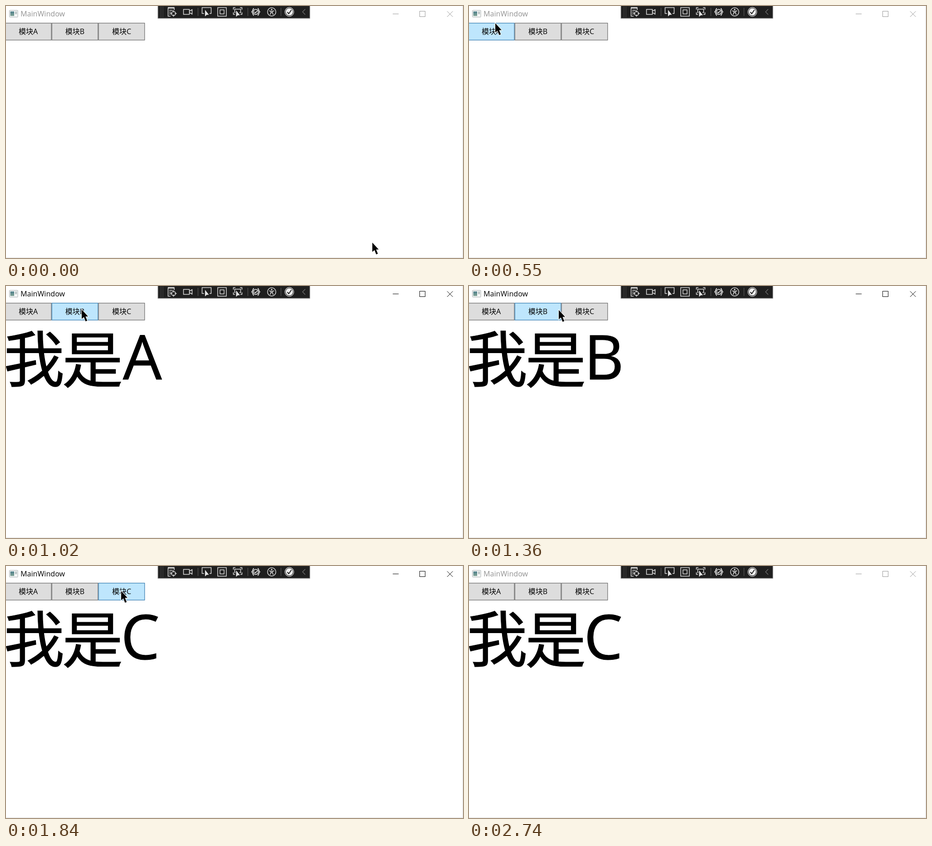
An HTML page for the animation above (2810 ms loop, 1008 by 556 pixels).

```html
<!DOCTYPE html>
<html lang="zh">
<head>
<meta charset="utf-8">
<title>MainWindow</title>
<style>
  html, body { margin: 0; width: 100%; height: 100%; overflow: hidden; background: #fff; }
  svg { display: block; width: 1008px; height: 556px; }
  text { font-family: "Open Sans", "Noto Sans CJK SC", "Noto Sans CJK", sans-serif; }
  .han { font: 134px "Noto Sans CJK SC", "Noto Sans CJK", sans-serif; }
  .label { font-size: 16px; text-anchor: middle; }
</style>
</head>
<body>
<svg viewBox="0 0 1008 556">
  <defs>
    <path id="pick" d="M0 0V14.5L3.6 11L8.5 10.8Z"/>
    <linearGradient id="pane" x2="0" y2="1">
      <stop offset="0" stop-color="#4f7f8c"/><stop offset="1" stop-color="#7fa395"/>
    </linearGradient>
  </defs>
  <rect width="1008" height="556" fill="#fff"/>
  <path d="M1007.5 0V555.5H0" fill="none" stroke="#dedede"/>

  <!-- title bar -->
  <g>
    <rect x="7.5" y="9.5" width="18.5" height="15" rx="1" fill="#f4f6f6" stroke="#a9afb0"/>
    <rect x="9.5" y="12" width="8.5" height="10" fill="url(#pane)"/>
    <rect x="20" y="12" width="4" height="6" fill="#bcc5c6"/>
  </g>
  <text id="title" x="32" y="23" font-size="16.1">MainWindow</text>
  <g id="controls" fill="none">
    <path d="M853 17.5H866"/>
    <rect x="912.5" y="11.5" width="12" height="12"/>
    <path d="M973 11.5L985.5 24M985.5 11.5L973 24"/>
  </g>

  <!-- debug toolbar -->
  <rect x="335.3" y="-2" width="334.7" height="29" fill="#1f1f1f" stroke="#666" stroke-width="1.28"/>
  <g id="grip" fill="#606060"></g>
  <path d="M423.5 4V22M533.5 4V22M606.5 4V22" stroke="#5e5e5e"/>
  <g fill="none" stroke="#dcdcdc" stroke-width="1.5">
    <path d="M357.5 4V22.5H363M371 4V9"/>
    <path d="M357 4H371.5" stroke-width="3"/>
    <path d="M360 9.5H368M360 13.5H363.5M360 17.5H363"/>
    <circle cx="369.5" cy="16.5" r="4.6"/>
    <path d="M369.5 9.5V14M369.5 19V23.5M362.5 16.5H367M372 16.5H376.5"/>
    <path d="M391.5 7.5H404.5V18.5H391.5ZM404.5 11.5L410.5 8V18L404.5 14.5"/>
    <path d="M437 16.5H432.5V3.5H452.5V16.5H449"/>
    <rect x="467" y="3.5" width="19" height="19"/>
    <rect x="472" y="8.5" width="9" height="9"/>
    <path d="M501.5 8V3.5H506M516 3.5H520.5V8M501.5 14V18.5H505M520.5 14V18.5H517"/>
    <path d="M506 14.5H504.5V7H517.5V14.5H515"/>
    <g stroke-width="1.8">
      <path d="M547 5.5C543.5 5.5 545.5 12 541.5 13C545.5 14 543.5 20.5 547 20.5M555 5.5C558.5 5.5 556.5 12 560.5 13C556.5 14 558.5 20.5 555 20.5"/>
      <circle cx="551" cy="13" r="5.6"/>
      <path d="M548 13L550.3 15.3L554.3 10.7"/>
    </g>
    <circle cx="586" cy="13" r="9.2"/>
    <path d="M580.5 10.5L584 11.7H588L591.5 10.5M584.3 11.7V14.5L582.5 19.2M587.7 11.7V14.5L589.5 19.2M584.3 14.7H587.7"/>
  </g>
  <circle cx="586" cy="8" r="1.7" fill="#dcdcdc"/>
  <g fill="#e4e4e4" stroke="#1f1f1f" stroke-width="1.2" paint-order="stroke">
    <use href="#pick" x="439" y="8.5"/>
    <use href="#pick" x="507.5" y="9.5"/>
  </g>
  <circle cx="625" cy="13" r="9.8" fill="#1f1f1f" stroke="#e6e6e6" stroke-width="1.2"/>
  <circle cx="625" cy="13" r="8" fill="#f0f0f0"/>
  <path d="M620.5 13.5L623.7 17L629.5 8.7" fill="none" stroke="#1f1f1f" stroke-width="2"/>
  <path d="M660 7L654 13L660 19" fill="none" stroke="#777" stroke-width="1.1"/>

  <g id="tabs" stroke-width="1.28"></g>

  <g id="view" stroke="#000" stroke-width="1.2">
    <text class="han" x="-5" y="211">我</text>
    <text class="han" x="124" y="213">是</text>
    <text id="letter" y="205.5" font-size="135"></text>
  </g>

  <path id="cursor" d="M0 0V20.5L4.8 16.5L8.5 26L12.2 24.5L8.4 15.2H14Z"
        stroke="#fff" stroke-width="2" paint-order="stroke"/>
</svg>
<script>
const LOOP = 2810;
const $ = id => document.getElementById(id);

function add(parent, tag, attrs, text = "") {
  const el = document.createElementNS("http://www.w3.org/2000/svg", tag);
  for (const key in attrs) el.setAttribute(key, attrs[key]);
  el.textContent = text;
  return parent.appendChild(el);
}

for (let row = 0; row < 8; row++)
  for (let col = 0; col < 3; col++)
    add($("grip"), "rect", { x: 340 + col * 3, y: 2 + row * 3, width: 1.2, height: 1.2 });

const TAB = 102.9;
const tabs = ["A", "B", "C"].map((name, i) => {
  const left = -2.3 + i * TAB;
  const box = add($("tabs"), "rect", {
    x: left + 0.64, y: 37.7, width: TAB - 1.28, height: 37.5
  });
  add($("tabs"), "text", { class: "label", x: left + TAB / 2, y: 62 }, "模块" + name);
  return { left, box };
});

// Pointer strokes: sampled in discrete steps along a quadratic curve.
const strokes = [
  { start: 70, end: 550, steps: 8, from: [808, 522], via: [130, 250], to: [58, 38], power: 1 },
  { start: 620, end: 1020, steps: 7, from: [58, 38], via: [112, 50], to: [167, 52], power: 1.6 },
  { start: 1290, end: 1570, steps: 5, from: [167, 52], via: [212, 53], to: [254, 55], power: 1 },
  { start: 1910, end: 2190, steps: 5, from: [255, 55], via: [290, 200], to: [840, 486], power: 1 }
];
const pages = [
  { start: 690, name: "A", x: 258 },
  { start: 1220, name: "B", x: 254 },
  { start: 1770, name: "C", x: 253.5 }
];

const latest = (list, t) => list.filter(item => item.start <= t).pop();

function pointer(t) {
  const s = latest(strokes, t);
  if (!s) return strokes[0].from;
  const gap = (s.end - s.start) / (s.steps - 1);
  const u = Math.min(1, (Math.floor((t - s.start) / gap + 1e-6) + 1) / s.steps);
  const k = Math.pow(u * u * (3 - 2 * u), s.power);
  return [0, 1].map(i =>
    (1 - k) ** 2 * s.from[i] + 2 * k * (1 - k) * s.via[i] + k * k * s.to[i]);
}

function draw(t) {
  const [x, y] = pointer(t);
  const active = t >= 620 && t < 2740;
  const page = latest(pages, t);

  $("title").setAttribute("fill", active ? "#000" : "#939393");
  $("controls").setAttribute("stroke", active ? "#000" : "#999");

  for (const { left, box } of tabs) {
    const over = y >= 37 && y < 76 && x >= left && x < left + TAB;
    box.setAttribute("fill", over ? "#bee6fd" : "#ddd");
    box.setAttribute("stroke", over ? "#3c7fb1" : "#707070");
  }

  $("view").setAttribute("visibility", page ? "visible" : "hidden");
  if (page) {
    $("letter").textContent = page.name;
    $("letter").setAttribute("x", page.x);
  }

  $("cursor").setAttribute("visibility", t < 2260 ? "visible" : "hidden");
  $("cursor").setAttribute("transform", `translate(${Math.round(x)} ${Math.round(y)})`);
}

const origin = performance.now();
function tick() {
  draw((performance.now() - origin) % LOOP);
  requestAnimationFrame(tick);
}
tick();
</script>
</body>
</html>
```
